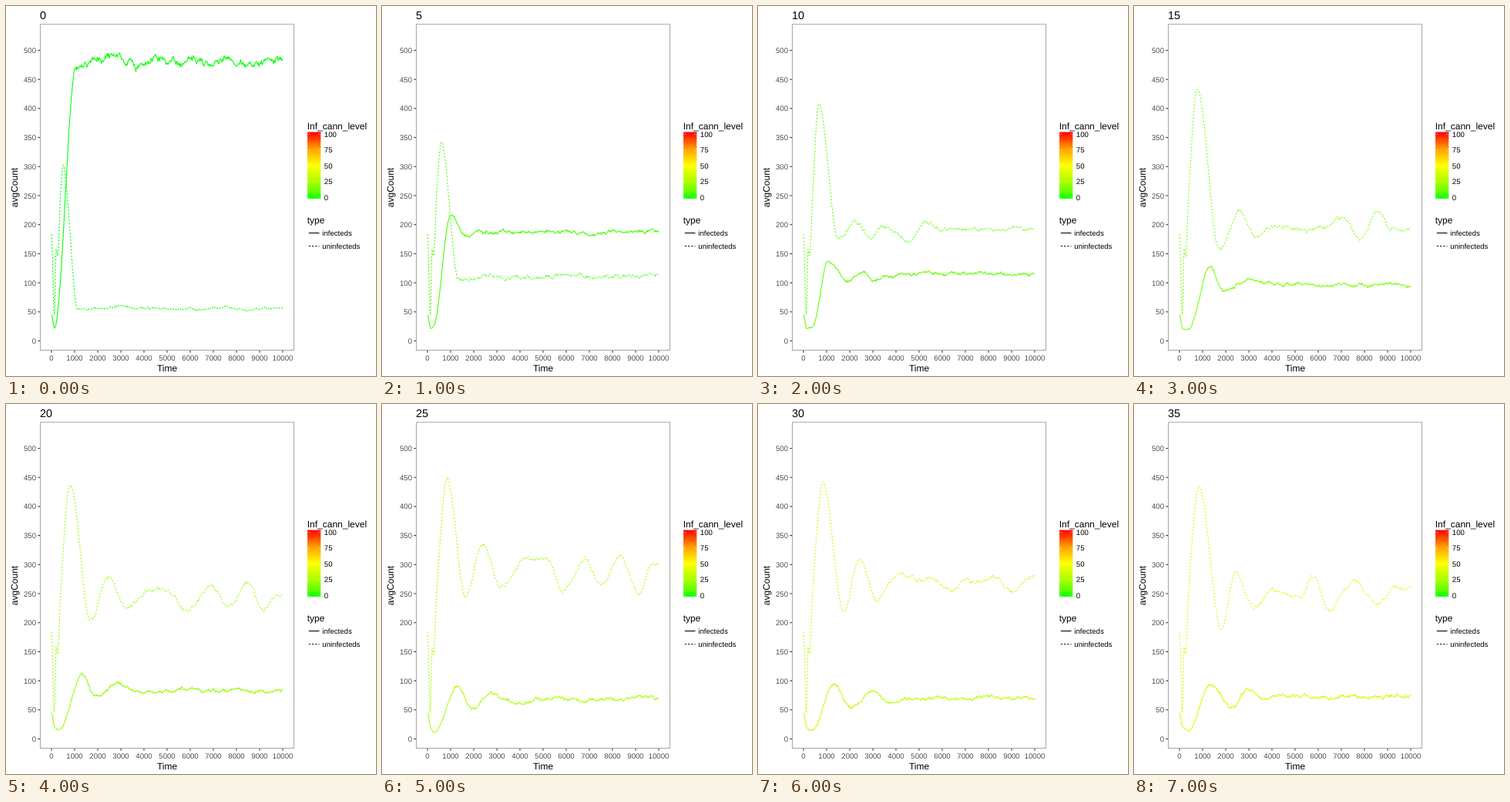
Write an HTML page that moves like this. It is 480 by 480 pixels and loops after 8 s.

```html
<!DOCTYPE html>
<html lang="en">
<head>
<meta charset="utf-8">
<title>Average count by level</title>
<style>
  html, body { margin: 0; width: 100%; height: 100%; overflow: hidden; background: #fff; }
  svg {
    display: block; width: 480px; height: 480px;
    font: 9.6px "Liberation Sans", Arial, sans-serif;
    text-rendering: geometricPrecision;
  }
  .axis { fill: #4d4d4d; }
  .title { font-size: 12px; }
  .head { font-size: 14.4px; }
  .tick { stroke: #333; stroke-width: 1.07; }
  .line { fill: none; stroke-width: 1.07; stroke-linejoin: round; }
  .dash { stroke-dasharray: 2.13 2.13; }
  .level { visibility: hidden; animation: show 8s step-end infinite; }
  @keyframes show { 0% { visibility: visible; } 12.5%, 100% { visibility: hidden; } }
</style>
</head>
<body>
<svg id="plot" viewBox="0 0 480 480">
  <defs>
    <linearGradient id="ramp" x1="0" y1="1" x2="0" y2="0">
      <stop offset="0" stop-color="#0f0"/>
      <stop offset=".1" stop-color="#61ff00"/>
      <stop offset=".25" stop-color="#a8ff00"/>
      <stop offset=".5" stop-color="#ff0"/>
      <stop offset=".75" stop-color="#ff9f00"/>
      <stop offset="1" stop-color="#f00"/>
    </linearGradient>
  </defs>
  <rect x="44.5" y="23.7" width="329" height="422.8" fill="none" stroke="#a6a6a6"/>
  <text class="title" x="209" y="474" text-anchor="middle">Time</text>
  <text class="title" transform="translate(15 235.5) rotate(-90)" text-anchor="middle">avgCount</text>
  <text class="title" x="390.7" y="160">Inf_cann_level</text>
  <rect x="391" y="163.5" width="17.3" height="86.4" fill="url(#ramp)"/>
  <text class="title" x="390.7" y="282">type</text>
  <path class="line" stroke="#000" d="M392.8 294.5H406.5"/>
  <path class="line dash" stroke="#000" d="M392.8 311.5H406.5"/>
  <text x="410.3" y="298">infecteds</text>
  <text x="410.3" y="315">uninfecteds</text>
</svg>
<script>
const plot = document.getElementById('plot');
const px = t => 59 + 0.03 * t;
const py = v => 434.5 - 0.754 * v;

function add(parent, tag, attrs, text) {
  const el = document.createElementNS('http://www.w3.org/2000/svg', tag);
  for (const key in attrs) el.setAttribute(key, attrs[key]);
  if (text !== undefined) el.textContent = text;
  return parent.appendChild(el);
}

for (let v = 0; v <= 500; v += 50) {
  const y = py(v);
  add(plot, 'path', { class: 'tick', d: `M41.3 ${y}H44` });
  add(plot, 'text', { class: 'axis', x: 39, y: y + 3.5, 'text-anchor': 'end' }, v);
}
for (let t = 0; t <= 10000; t += 1000) {
  add(plot, 'path', { class: 'tick', d: `M${px(t)} 447V449.7` });
  add(plot, 'text', { class: 'axis', x: px(t), y: 460, 'text-anchor': 'middle' }, t);
}
for (let v = 0; v <= 100; v += 25) {
  const y = 248.4 - 0.82 * v;
  add(plot, 'path', { d: `M391 ${y}h3.5m10.3 0h3.5`, stroke: '#fff', 'stroke-width': 0.4 });
  add(plot, 'text', { x: 412.8, y: y + 3.2 }, v);
}

function random(seed) {
  return () => (seed = (seed * 16807) % 2147483647) / 2147483647;
}

// Smooth curve through t,v turning points; holds the last value.
function curve(...p) {
  const n = p.length / 2, T = i => p[2 * i], V = i => p[2 * i + 1];
  const slope = i => (V(i + 1) - V(i)) / (T(i + 1) - T(i));
  const tangent = i => {
    if (i < 1 || i > n - 2) return 0;
    const a = slope(i - 1), b = slope(i);
    return a * b > 0 ? 2 * a * b / (a + b) : 0;
  };
  return t => {
    let i = 0;
    while (i < n - 2 && t > T(i + 1)) i++;
    const h = T(i + 1) - T(i), u = Math.min(1, (t - T(i)) / h), w = 1 - u;
    return V(i) * w * w * (1 + 2 * u) + V(i + 1) * u * u * (3 - 2 * u)
      + h * u * w * (w * tangent(i) - u * tangent(i + 1));
  };
}
// Every run starts alike; the turning points that follow set it apart.
const infected = (...p) => curve(0, 45, 130, 21, ...p);
const healthy = (...p) => curve(0, 184, 120, 44, 200, 158, 265, 145, 400, 258, ...p);
const mean = (f, g) => t => (f(t) + g(t)) / 2;

const levels = {
  0: [infected(1050, 472, 1800, 480), healthy(500, 302, 1130, 56)],
  5: [infected(300, 28, 1000, 219, 1700, 180, 2200, 187), healthy(600, 342, 1330, 107, 2200, 112)],
  10: [infected(380, 23, 1080, 140, 1900, 102, 2600, 122, 3000, 105, 3500, 115),
    healthy(660, 409, 1480, 178, 2300, 204, 2900, 180, 3350, 200, 4600, 175, 5250, 200, 5850, 192)],
  15: [infected(400, 20, 1330, 126, 1900, 87, 3000, 108, 3800, 97),
    healthy(760, 432, 1730, 158, 2600, 227, 3250, 182, 4100, 199, 6100, 193, 7100, 211, 7800, 173, 8550, 226, 9200, 194)],
  25: [infected(300, 13, 1300, 92, 1900, 53, 2730, 82, 4050, 60, 4800, 68),
    healthy(850, 447, 1630, 249, 2400, 335, 3150, 261, 4270, 309, 5250, 304, 5850, 253, 6800, 310, 7500, 272, 8350, 316, 9150, 252, 9700, 300)],
  35: [infected(400, 15, 1330, 95, 2250, 54, 3000, 86, 3600, 66, 4200, 73),
    healthy(850, 438, 1800, 185, 2430, 287, 3200, 222, 4000, 257, 5200, 243, 5750, 281, 6500, 226, 7600, 271, 8600, 232, 9350, 258)],
};
for (const level of [20, 30]) {
  levels[level] = levels[level - 5].map((f, i) => mean(f, levels[level + 5][i]));
}

// Adds a slow drift and fine jitter that grow once the run has settled.
function trace(f, noise, seed) {
  const rnd = random(seed), spread = () => noise * (2 * rnd() - 1);
  let drift = 0, d = '';
  for (let t = 0; t <= 10000; t += 25) {
    drift = 0.9 * drift + spread();
    const v = f(t) + (drift + 0.7 * spread()) * Math.min(1, 0.2 + t / 1800);
    d += `${d ? 'L' : 'M'}${px(t).toFixed(1)} ${py(v).toFixed(1)}`;
  }
  return d;
}

// Integer keys iterate in ascending order: one level per second.
Object.entries(levels).forEach(([level, [solid, dashed]], i) => {
  const group = add(plot, 'g', { class: 'level', style: `animation-delay:${i}s` });
  const stroke = `rgb(${Math.round(255 * (level / 50) ** 0.6)},255,0)`;
  add(group, 'text', { class: 'head', x: 44, y: 17 }, level);
  add(group, 'path', { class: 'line', stroke, d: trace(solid, i ? 1.8 : 4, 91100 + 7777 * i) });
  add(group, 'path', { class: 'line dash', stroke, d: trace(dashed, i ? 2 : 1.3, 420100 + 5353 * i) });
});
</script>
</body>
</html>
```
